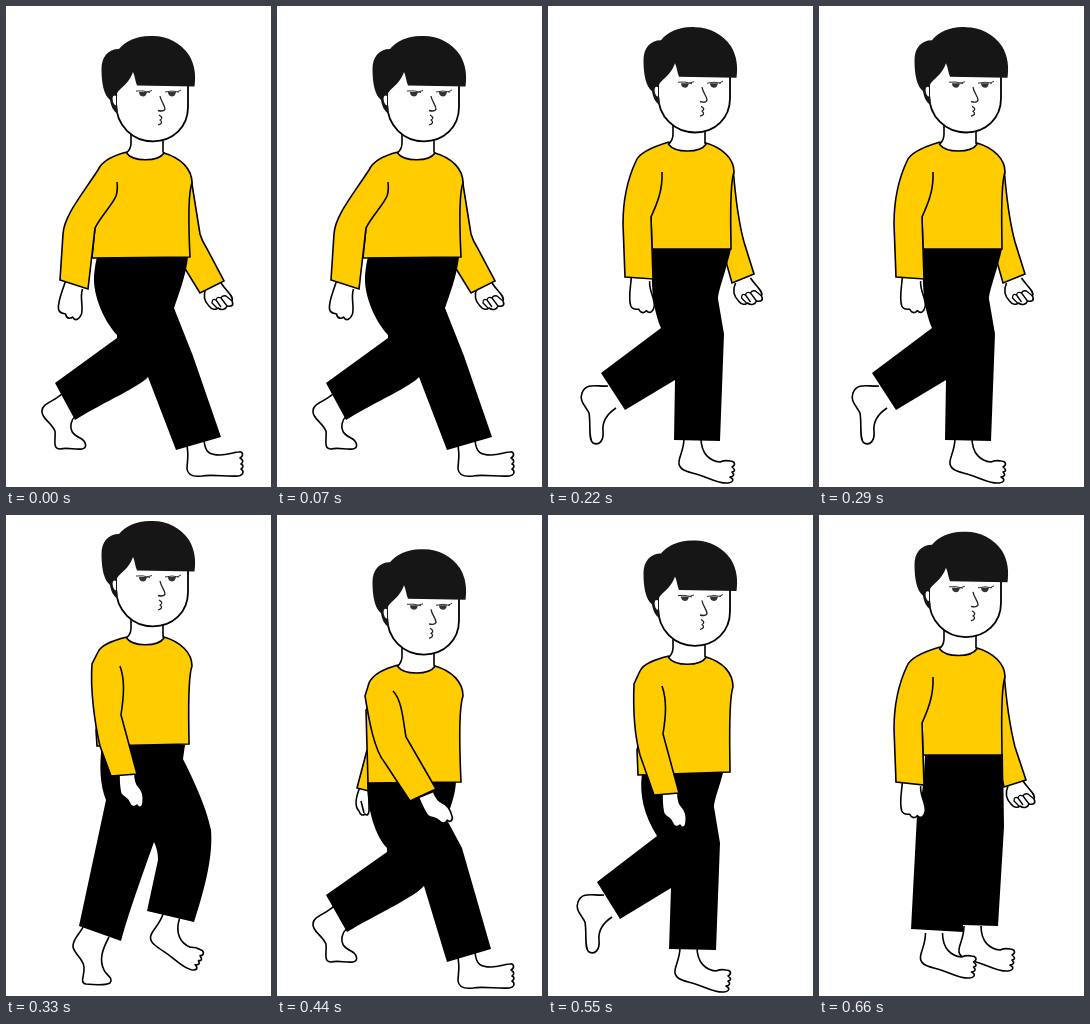
An HTML page for the animation above (770 ms loop, 265x481 px).

```html
<!DOCTYPE html>
<html lang="en">
<head>
<meta charset="utf-8">
<title>Walk cycle</title>
<style>
html, body { margin: 0; width: 100%; height: 100%; overflow: hidden; background: #fff; }
svg { display: block; width: 100vw; height: 100vh; }
path { stroke: #000; stroke-width: 1.6; stroke-linejoin: round; fill: #fff; }
.top { fill: #fc0; stroke-linejoin: miter; }
.leg { fill: #000; stroke: none; }
.hair { fill: #161616; stroke: none; }
.line { fill: none; stroke-width: 1.3; }
.lid { fill: none; stroke: #333; stroke-width: 1; }
.dark { fill: #333; stroke: none; }
.pose { visibility: hidden; animation: show 770ms step-end infinite; animation-delay: calc(var(--i) * 110ms - 770ms); }
@keyframes show {
  0% { visibility: visible; }
  14.28571%, 100% { visibility: hidden; }
}
</style>
</head>
<body>
<svg viewBox="0 0 265 481">
<defs>
  <g id="head">
    <path d="M125 118V137Q125 143 120.500 147C127 156 152 156 158 147L157 146V120"/>
    <path d="M110 80V97C110 120 127 135.300 147 135.300C167 135.300 182 121 182 101V76" style="stroke-width:1.8"/>
    <path class="hair" d="M147 30C132 29 119 35 113 43C102 43 95.500 51 95.500 63C95.500 78 98 89 104 94C105 100 107 105 112 108L110 90C112 82 122 80 127 66C129 70 129 75 131 79.500L188.500 80.500C190 70 189 59 183 49C175 37 161 30 147 30Z"/>
    <path d="M110 90C107 88 105.500 92 107.500 97Q109 100 110 99" style="stroke:none"/>
    <path class="lid" d="M130 85Q137 84 144 86.500M141 86L146 84.500M159 86Q166 84 173 86M171 86L175 84"/>
    <path class="dark" d="M133 86H141Q140 90.500 137 90.500Q133 90 133 86ZM162 86H170Q169 90.500 166 90.500Q162 90 162 86Z"/>
    <path class="line" d="M154 90C155 96 159 99 159 103Q158 106 152 104.500M153 109Q158 112 154 114Q158 117 152 119" style="stroke:#222"/>
  </g>
  <path id="fist" d="M-9 -4C-12 6 -17 16 -16 24C-15 29 -11 28 -9 29C-8 34 -4 34 -2 32C1 37 5 34 7 29C9 20 5 13 8 4"/>
  <path id="hand" d="M-8 -2C-8 7 -8 13 -6 18C-3 22 1 22 2 26C4 32 8 31 10 29C12 33 16 31 16 27C17 20 16 15 12 11C9 8 8 4 8 -2"/>
  <g id="palm">
    <path d="M-7 1C-10 8 -9 14 -4 19C-1 23 3 23 5 21C9 24 13 22 14 19C19 20 21 18 19 14C21 9 14 5 8 -4"/>
    <path class="line" d="M4 21L-1 16Q-1 11 3 13L8 20M3 13Q4 9 8 11L14 19M8 11Q9 8 13 9L19 14"/>
  </g>
  <path id="flat" d="M181 440C183 450 181 457 181 463C182 470 188 471 196 470C205 468 222 471 232 470C238 469 238 465 235 463Q239 460 235 458Q239 455 234 452C238 450 237 445 233 446C228 446 222 449 214 449C204 449 199 447 198 434"/>
  <path id="heel" d="M57 387C48 396 36 397 36 405C35 412 45 416 49 425C50 433 46 443 54 443C62 441 68 444 76 443C82 442 80 435 74 432C66 428 64 424 65 418Q66 413 70 409"/>
  <path id="raised" d="M37 377C27 378 15 373 11 384C8 392 14 396 18 404C20 416 17 430 22 434C28 437 33 432 32 422C31 412 36 405 45 399"/>
  <path id="step" d="M136 432C136 445 130 452 131 458C132 464 140 466 148 468C160 471 170 478 180 477C186 476 186 473 182 471Q188 470 184 466Q189 465 184 461C188 459 187 455 182 455Q177 454 172 456C162 455 153 448 153 432"/>
</defs>

<g class="pose" style="--i:0">
  <use href="#palm" x="207" y="281"/>
  <path class="top" d="M185 172L194 228Q196 235 200 241L218 275L194 287L178 261L182 200"/>
  <use href="#flat"/><use href="#heel"/>
  <path class="leg" d="M91 251H182C180 270 172 290 168 302L187 350L215 431L170 444L142 371C133 381 100 395 69 414L49 377L111 332V329C98 315 87 290 88 270Q89 258 91 251Z"/>
  <use href="#fist" x="68.500" y="279"/>
  <path class="top" d="M121 146Q139 160 158 147C175 152 186 163 186 177C181 190 183 230 184 251L86 252L89 222L105 176"/>
  <path class="top" d="M121 146C105 150 95 157 92 164C75 190 58 210 57 228L54 274L82 283L89 222C95 210 107 198 110 190Q112 184 111 176"/>
  <use href="#head"/>
</g>

<g class="pose" style="--i:1">
  <use href="#palm" transform="translate(234 283) rotate(-18)"/>
  <path class="top" d="M185 185C195 207 200 222 208 236L240 272L222 291C200 270 184 250 183 225"/>
  <use href="#flat" x="-2" y="6"/><use href="#raised"/>
  <path class="leg" d="M89 265H182C178 280 170 295 164 303L184 345L211 438L165 452L140 366L134 363C125 372 100 382 46 400L32 362L99 328C88 312 82 290 89 265Z"/>
  <use href="#fist" transform="translate(51 286) rotate(18)"/>
  <path class="top" d="M121 160Q139 173 158 160C175 165 186 176 186 190C181 204 183 243 184 265H84L87 230L102 188"/>
  <path class="top" d="M121 160C107 163 98 168 94 173C80 194 62 208 57 224C50 240 44 260 38 280L64 293L86 231C92 222 105 214 108 203Q109 196 108 188"/>
  <use href="#head" y="13.500"/>
</g>

<g class="pose" style="--i:2">
  <use href="#palm" x="194.500" y="276"/>
  <path class="top" d="M185 161C188 200 193 225 196 236L206 268L184 277L177 252L182 200"/>
  <use href="#step"/><use href="#raised" x="23" y="3"/>
  <path class="leg" d="M105 243H183C178 265 170 285 170 293L176 328L172 435L126 434L127 374L77 404L53 367L113 322C105 303 102 280 105 243Z"/>
  <use href="#fist" transform="translate(93 273) rotate(-13)"/>
  <path class="top" d="M121 136Q139 150 158 137C175 142 186 153 186 166C181 180 183 222 183 243H104L103 211L108 166"/>
  <path class="top" d="M121 136C104 141 91 147 88 155C80 172 75 194 75 218L77 271L105 273L103 211C108 200 115 185 114 166"/>
  <use href="#head" y="-8.800"/>
</g>

<g class="pose" style="--i:3">
  <use href="#step" transform="translate(165 404) rotate(18) translate(-145 -435)"/>
  <path d="M78 410C75 418 66 424 67 432C69 440 77 443 78 452C79 460 73 468 80 469C89 470 98 471 104 468C108 463 100 460 98 455C93 445 96 435 103 422"/>
  <path class="leg" d="M96 230H179L177 244C185 260 200 290 205 315C207 340 200 370 188 407L141 396L152 345Q152 335 148 327C140 350 125 390 115 426L73 411L100 285C94 270 93 250 96 230Z"/>
  <use href="#hand" x="121" y="261"/>
  <path class="top" d="M121 122Q139 135 158 122C175 127 186 138 186 151C181 165 183 208 183 229L91 231L90 215L108 151"/>
  <path class="top" d="M121 122C105 126 95 130 92 137L86 149C84 175 89 210 94 231L105 261L131 259L115 200C118 180 119 165 114 151"/>
  <use href="#head" y="-24"/>
</g>

<g class="pose" style="--i:4">
  <path d="M83 272C78 284 78 292 82 296Q84 302 88 299Q91 302 92 296V272M84 286L87 298"/>
  <path class="top" d="M90 235L80 273L92 276"/>
  <use href="#flat" y="3"/><use href="#heel" y="4"/>
  <path class="leg" d="M90 267H179C178 283 172 294 170 305L185 333L214 434L170 447L147 371C136 383 100 399 70 417L49 380L110 337V333C99 322 90 295 90 267Z"/>
  <use href="#hand" transform="translate(150 282) rotate(-22)"/>
  <path class="top" d="M121 150Q139 164 158 151C175 156 186 167 186 181C181 195 183 245 184 267L91 268L89 195L109 176"/>
  <path class="top" d="M121 150C106 154 96 159 92 168L88 181C92 205 97 235 108 248L133 286L159 274L129 222C126 205 125 185 116 176"/>
  <use href="#head" y="4.300"/>
</g>

<g class="pose" style="--i:5">
  <use href="#step" x="-4"/><use href="#raised" x="19" y="3"/>
  <path class="leg" d="M94 258H175C172 270 166 285 166 292L172 328L168 435L121 434L123 373L72 404L49 367L109 321C96 300 91 280 94 258Z"/>
  <use href="#hand" x="122" y="281"/>
  <path class="top" d="M121 141Q139 155 158 142C175 147 185 158 185 172C180 186 182 236 182 257L90 260L89 235L108 171"/>
  <path class="top" d="M121 141C105 145 95 149 92 156L86 169C85 195 87 222 92 240L106 280L131 278L115 219C118 200 119 185 114 171"/>
  <use href="#head" y="-4.500"/>
</g>

<g class="pose" style="--i:6">
  <use href="#palm" x="196" y="270"/>
  <path class="top" d="M185 157C188 196 193 220 196 232L207 265L185 272L180 250L182 200"/>
  <use href="#step" x="9" y="-21"/><use href="#step" x="-29.500" y="-14"/>
  <path class="leg" d="M106 239H184L185 312L179 411L144 410V417L92 414L98 300C102 290 105 270 106 239Z"/>
  <use href="#fist" transform="translate(93 269) rotate(-13)"/>
  <path class="top" d="M121 132Q139 146 158 133C175 138 186 149 186 162C181 176 183 218 183 240H104L103 208L108 162"/>
  <path class="top" d="M121 132C104 137 91 143 88 151C80 168 75 190 75 214L77 267L105 270L103 208C108 197 115 181 114 162"/>
  <use href="#head" y="-13.200"/>
</g>
</svg>
</body>
</html>
```
